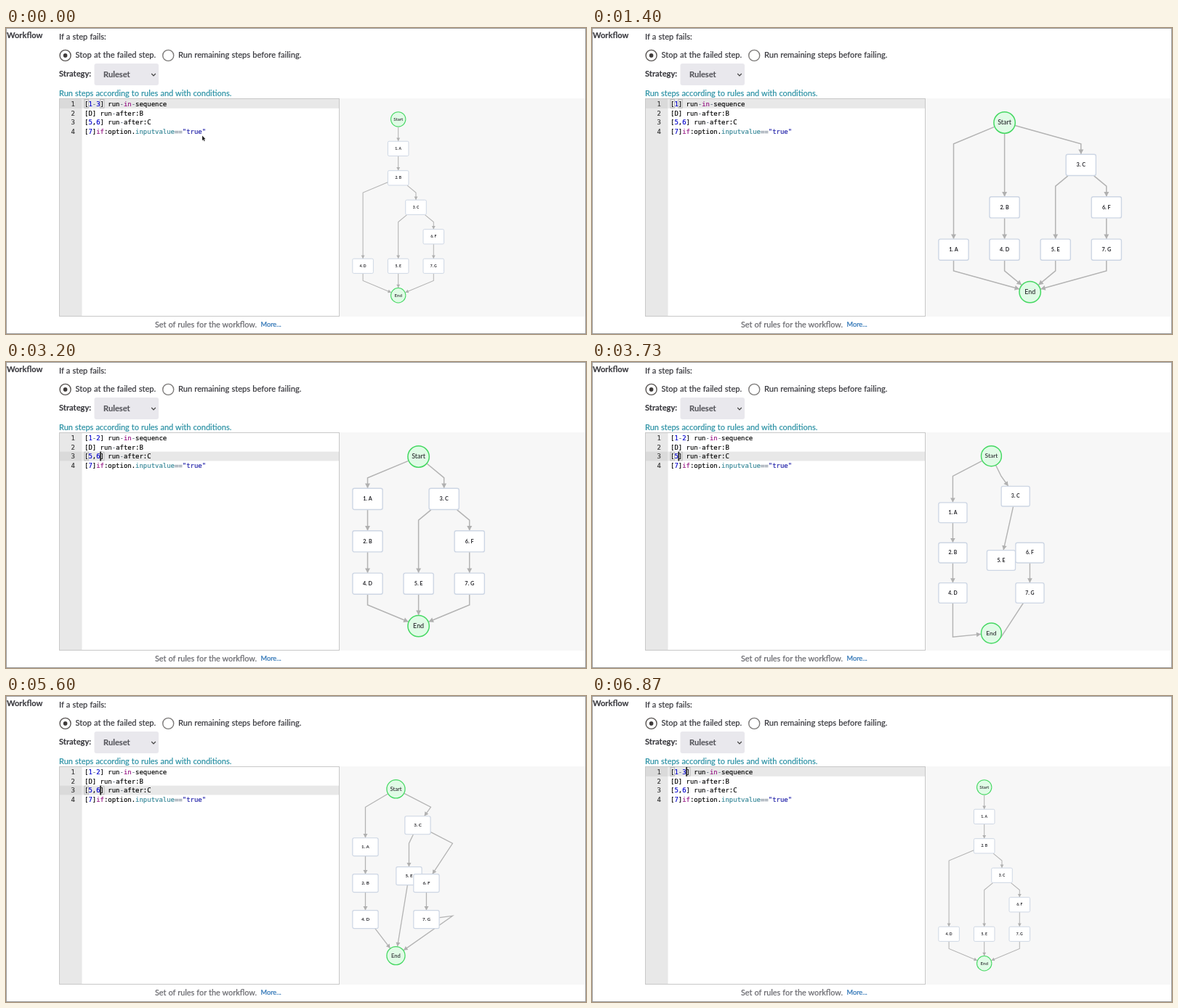
Animation, 798 px wide and 422 px high, one loop 6.93 s. Source, as an HTML page with a canvas:

```html
<!DOCTYPE html>
<html lang="en">
<head>
<meta charset="utf-8">
<title>Workflow ruleset</title>
<style>
html, body { margin: 0; width: 100%; height: 100%; overflow: hidden; background: #fff; }
canvas, svg { position: absolute; left: 0; top: 0; width: 798px; height: 422px; }
text { --ink: #3b3b40; font: 500 11.1px Lato, "Open Sans", sans-serif; word-spacing: .3px; white-space: pre; }
text, tspan { fill: var(--ink); stroke: var(--ink); stroke-width: .15px; }
.bold { font-weight: 700; }
.soft { --ink: #58585e; }
.hint { --ink: #2f93a6; font-size: 10.95px; }
.note { --ink: #6b6b70; font-size: 10.85px; }
.more { --ink: #2a72b5; font-size: 9.2px; }
.code, .num { --ink: #000; font: 8.96px "DejaVu Sans Mono", monospace; word-spacing: 0; }
.num { --ink: #333; }
.int { --ink: #0000cd; }
.key { --ink: #930f80; }
.op { --ink: #687687; }
.var { --ink: #318495; }
.str { --ink: #1a1aa6; }
</style>
</head>
<body>
<canvas id="stage"></canvas>
<svg viewBox="0 0 798 422">
  <text class="bold" x="1" y="14">Workflow</text>
  <text x="73" y="16">If a step fails:</text>
  <text x="95.5" y="41">Stop at the failed step.</text>
  <text x="237" y="41">Run remaining steps before failing.</text>
  <text class="bold" x="73" y="67">Strategy:</text>
  <text class="bold soft" x="134" y="68">Ruleset</text>
  <text class="hint" x="73" y="94">Run steps according to rules and with conditions.</text>
  <text class="note" x="205" y="412.5">Set of rules for the workflow.</text>
  <text class="more" x="350.5" y="412.3">More...</text>
  <g id="code"></g>
</svg>
<script>
const LOOP = 6930, TICK = 200 / 3, ZOOM_LAG = 82;
const COL = 70.1, RANK = 58.4, R = 15.2, HW = 20.9, HH = 14.9;
const CH = 5.394, LINE = 12.8, CODE_X = 108, CODE_Y = 98;

// Node places and edge bends in (column, rank) units
const layouts = {
  chain3: {
    nodes: { S: [1, 0], A: [1, 1], B: [1, 2], C: [1.5, 3], D: [0, 5], E: [1, 5], F: [2, 4], G: [2, 5], Z: [1, 6] },
    edges: ['SA', 'AB', 'BD 0 2.5', 'BC 1.5 2.5', 'CE 1 3.5', 'CF 2 3.5', 'FG', 'DZ 0 5.5', 'EZ', 'GZ 2 5.5']
  },
  chain1: {
    nodes: { S: [1, 0], A: [0, 3], B: [1, 2], C: [2.5, 1], D: [1, 3], E: [2, 3], F: [3, 2], G: [3, 3], Z: [1.5, 4] },
    edges: ['SA 0 .5', 'SB', 'SC 2.5 .5', 'BD', 'CE 2 1.5', 'CF 3 1.5', 'FG', 'AZ 0 3.5', 'DZ 1 3.5', 'EZ 2 3.5', 'GZ 3 3.5']
  },
  chain2: {
    nodes: { S: [1, 0], A: [0, 1], B: [0, 2], C: [1.5, 1], D: [0, 3], E: [1, 3], F: [2, 2], G: [2, 3], Z: [1, 4] },
    edges: ['SA 0 .5', 'AB', 'BD', 'SC 1.5 .5', 'CE 1 1.5', 'CF 2 1.5', 'FG', 'DZ 0 3.5', 'EZ', 'GZ 2 3.5']
  },
  lanes: {
    nodes: { S: [.5, 0], A: [0, 2], B: [0, 3], C: [1, 1], D: [0, 4], E: [1, 2], F: [1, 3], G: [1, 4], Z: [.5, 5] },
    edges: ['SA 0 .5', 'AB', 'BD', 'SC 1 .5', 'CE', 'EF', 'FG', 'DZ 0 4.5', 'GZ 1 4.5']
  }
};
const labels = { S: 'Start', A: '1. A', B: '2. B', C: '3. C', D: '4. D', E: '5. E', F: '6. F', G: '7. G', Z: 'End' };

// shown at, from, to, motion start, duration, furthest progress
const moves = [
  [0, 'chain3', 'chain3', 0, 500, 1],
  [800, 'chain3', 'chain1', 600, 500, 1],
  [2400, 'chain1', 'chain2', 2367, 500, 1],
  [3667, 'chain2', 'lanes', 3530, 500, 1],
  [5400, 'lanes', 'chain2', 5400, 500, 1],
  [6133, 'chain2', 'chain1', 6133, 222, .9],
  [6866, 'chain3', 'chain3', 6866, 500, 1]
];

// time, first rule, third rule, caret row, caret column
const edits = [
  [0, '1-3', '5,6', 0, 4],
  [466, '1-', '5,6', 0, 3],
  [600, '1', '5,6', 0, 2],
  [2333, '1-', '5,6', 0, 3],
  [2400, '1-2', '5,6', 0, 4],
  [3000, '1-2', '5,6', 1, 4],
  [3200, '1-2', '5,6', 2, 4],
  [3533, '1-2', '5,', 2, 3],
  [3666, '1-2', '5', 2, 2],
  [5200, '1-2', '5,', 2, 3],
  [5400, '1-2', '5,6', 2, 4],
  [5933, '1-2', '5,6', 1, 4],
  [6000, '1-2', '5,6', 0, 4],
  [6133, '1-', '5,6', 0, 3],
  [6866, '1-3', '5,6', 0, 4]
];
const caretOff = [-133, 866, 1400, 1933, 3933, 4466, 4933];

const canvas = document.getElementById('stage');
const ctx = canvas.getContext('2d');
const dpr = window.devicePixelRatio || 1;
canvas.width = 798 * dpr;
canvas.height = 422 * dpr;

const clamp = (v, lo, hi) => Math.max(lo, Math.min(hi, v));
const mix = (a, b, p) => a + (b - a) * p;
const current = (list, t) => list.filter(e => e[0] <= t + 1).pop();

// Editor text
const codeGroup = document.getElementById('code');
const addText = (cls, x, row) => {
  const el = document.createElementNS('http://www.w3.org/2000/svg', 'text');
  el.setAttribute('class', cls);
  el.setAttribute('x', x);
  el.setAttribute('y', CODE_Y + row * LINE + 9.7);
  codeGroup.appendChild(el);
  return el;
};
const rows = [0, 1, 2, 3].map(i => {
  addText('num', 89.5, i).textContent = i + 1;
  return addText('code', CODE_X, i);
});
const kinds = [[/^\d/, 'int'], [/^"/, 'str'], [/^i[nf]$/, 'key'], [/^inputvalue$/, 'var'], [/^[-=]/, 'op']];
const paintCode = s => s.split(/(\d+|"[^"]*"|\bi[nf]\b|inputvalue|==|-)/).map(part => {
  const kind = kinds.find(k => k[0].test(part));
  return kind ? `<tspan class="${kind[1]}">${part}</tspan>` : part;
}).join('');
const shown = [];
function setCode(lines) {
  lines.forEach((s, i) => {
    if (shown[i] === s) return;
    shown[i] = s;
    rows[i].innerHTML = paintCode(s);
  });
}

function box(x, y, w, h, fill) {
  ctx.fillStyle = fill;
  ctx.fillRect(x, y, w, h);
}
function path(points, color, width) {
  ctx.beginPath();
  points.forEach(p => ctx.lineTo(p[0], p[1]));
  ctx.strokeStyle = color;
  ctx.lineWidth = width;
  ctx.stroke();
}
function disc(x, y, r, fill, stroke, width) {
  ctx.beginPath();
  ctx.arc(x, y, r, 0, Math.PI * 2);
  ctx.fillStyle = fill;
  ctx.fill();
  if (!stroke) return;
  ctx.strokeStyle = stroke;
  ctx.lineWidth = width;
  ctx.stroke();
}

function drawForm() {
  box(0, 0, 798, 422, '#fff');
  disc(81.6, 37.9, 7.5, '#fff', '#5a5654', 1.4);
  disc(81.6, 37.9, 2.8, '#3f3b3a');
  disc(223.2, 37.9, 7.5, '#fff', '#7c7a79', 1.4);
  ctx.beginPath();
  ctx.roundRect(121.5, 49, 88.5, 30, 3);
  ctx.fillStyle = '#e9e8ed';
  ctx.fill();
  path([[200.2, 63], [203, 65.9], [205.8, 63]], '#444', 1.2);
  box(459, 97, 339, 301, '#f7f7f7');
}

function drawEditor(t, edit, lines) {
  const [, , , row, col] = edit;
  const y = CODE_Y + row * LINE;
  box(73, 97, 31.5, 301, '#e8e8e8');
  box(73, y, 31.5, LINE, '#dadada');
  box(104.5, y, 354, LINE, '#e8e8e8');
  ctx.strokeStyle = '#c8c8c8';
  ctx.lineWidth = 1;
  ctx.strokeRect(73.5, 97.5, 385, 300);
  const close = lines[row].indexOf(']');
  if (col === close || col === close + 1) {
    ctx.strokeStyle = '#b0b0b0';
    ctx.lineWidth = .8;
    for (const c of [0, close]) ctx.strokeRect(CODE_X + c * CH, y + .5, CH, LINE - 1);
  }
  if (!caretOff.some(s => t >= s - 1 && t < s + 199)) box(CODE_X + col * CH - .2, y, 1.5, LINE, '#111');
}

function drawPointer(t) {
  if (t >= 465) return;
  const p = clamp((t - 20) / 400, 0, 1), e = p * p * (3 - 2 * p);
  ctx.save();
  ctx.translate(mix(270, 131, e), mix(148.5, 104, e));
  ctx.scale(.9, .9);
  ctx.beginPath();
  [[0, 0], [0, 7.4], [1.7, 5.9], [2.9, 8.5], [4, 8], [2.9, 5.4], [5.1, 5.3]].forEach(q => ctx.lineTo(q[0], q[1]));
  ctx.closePath();
  ctx.strokeStyle = '#fff';
  ctx.lineWidth = 1;
  ctx.stroke();
  ctx.fillStyle = '#222';
  ctx.fill();
  ctx.restore();
}

const toModel = ([c, r]) => [HW + c * COL, R + r * RANK];
const isRound = id => id === 'S' || id === 'Z';

// Where the line from a node's centre towards a point leaves the node
function rim(id, at, to) {
  const dx = to[0] - at[0], dy = to[1] - at[1], d = Math.hypot(dx, dy) || 1;
  const k = isRound(id) ? R / d : Math.min(HW / Math.abs(dx || 1e-6), HH / Math.abs(dy || 1e-6));
  return k < 1 ? [at[0] + dx * k, at[1] + dy * k] : null;
}

function drawEdge(spec, pos) {
  const [ends, ...bend] = spec.split(' ');
  const [a, b] = ends;
  const mid = bend.length ? [toModel(bend.map(Number))] : [];
  const start = rim(a, pos[a], mid[0] || pos[b]) || pos[a];
  const last = mid[0] || pos[a];
  const tip = rim(b, pos[b], last);
  path([start, ...mid, tip || pos[b]], '#b3b3b3', 1.5);
  // No room for an arrow when the bend touches the node
  if (!tip || Math.hypot(tip[0] - last[0], tip[1] - last[1]) < 1) return;
  ctx.save();
  ctx.translate(tip[0], tip[1]);
  ctx.rotate(Math.atan2(tip[1] - last[1], tip[0] - last[0]));
  ctx.beginPath();
  ctx.moveTo(0, 0);
  ctx.lineTo(-6.4, -3.5);
  ctx.lineTo(-6.4, 3.5);
  ctx.fillStyle = '#b0b0b0';
  ctx.fill();
  ctx.restore();
}

function drawNode(id, [x, y]) {
  if (isRound(id)) {
    disc(x, y, R - .5, '#e0fbe6', '#45d862', 1.5);
    ctx.font = '500 8.9px Lato, "Open Sans", sans-serif';
  } else {
    ctx.beginPath();
    ctx.roundRect(x - HW + .3, y - HH + .3, 2 * HW - .6, 2 * HH - .6, 2.5);
    ctx.fillStyle = '#fff';
    ctx.fill();
    ctx.strokeStyle = '#cdd6e4';
    ctx.lineWidth = 1.4;
    ctx.stroke();
    ctx.font = '700 7.2px Lato, "Open Sans", sans-serif';
  }
  ctx.fillStyle = '#26262b';
  ctx.textAlign = 'center';
  ctx.fillText(labels[id], x, y + (isRound(id) ? 2.9 : 2.4));
}

function drawGraph(t) {
  const [, from, to, start, span, cap] = current(moves, t);
  const a = layouts[from], b = layouts[to];
  const progress = time => clamp((time - start) / span, 0, cap);
  const p = progress(t);
  const pos = {};
  for (const id in labels) pos[id] = toModel([0, 1].map(i => mix(a.nodes[id][i], b.nodes[id][i], p)));
  // The zoom to fit follows a little behind the nodes
  const depth = mix(a.nodes.Z[1], b.nodes.Z[1], progress(t - ZOOM_LAG));
  const zoom = 264 / (depth * RANK + 2 * R);
  ctx.save();
  ctx.beginPath();
  ctx.rect(459, 97, 339, 301);
  ctx.clip();
  ctx.translate(476.6, 115.3);
  ctx.scale(zoom, zoom);
  b.edges.forEach(e => drawEdge(e, pos));
  for (const id in labels) drawNode(id, pos[id]);
  ctx.restore();
}

function draw(now) {
  const t = Math.floor((now % LOOP + 3.5) / TICK) * TICK;
  const edit = current(edits, t);
  const lines = [`[${edit[1]}] run-in-sequence`, '[D] run-after:B', `[${edit[2]}] run-after:C`, '[7]if:option.inputvalue=="true"'];
  ctx.setTransform(dpr, 0, 0, dpr, 0, 0);
  drawForm();
  drawEditor(t, edit, lines);
  drawGraph(t);
  drawPointer(t);
  ctx.strokeStyle = '#9a9a9a';
  ctx.lineWidth = 1;
  ctx.strokeRect(.5, .5, 797, 421);
  setCode(lines);
}

const begin = performance.now();
function frame() {
  draw(performance.now() - begin);
  requestAnimationFrame(frame);
}
frame();
</script>
</body>
</html>
```
